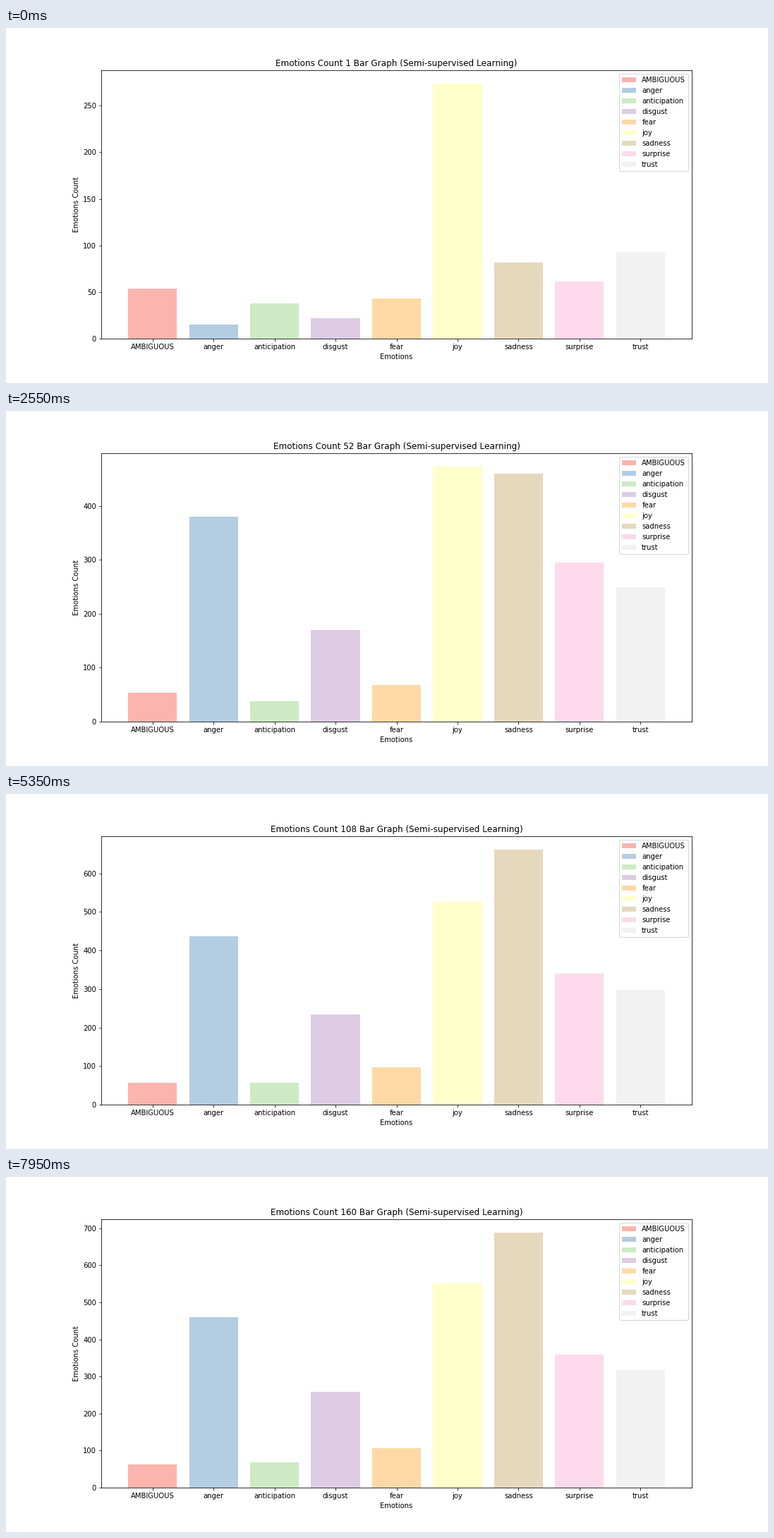
Recreate the animation shown at these times as a matplotlib script. Size 1080 px wide and 504 px high, loop 8 s.

```python
import numpy as np
import matplotlib.pyplot as plt
from matplotlib.animation import FuncAnimation

FRAMES = 160
INTERVAL = 50

# Growth of each count: start, rise, delay, time scale, sharpness
GROWTH = {
    "AMBIGUOUS": (54, 40, 82, 300, 1),
    "anger": (15, 500, 0, 28.4, 0.46),
    "anticipation": (38, 60, 60, 135, 1),
    "disgust": (22, 258, 0, 60.6, 0.95),
    "fear": (43, 72, 20, 67.6, 1.1),
    "joy": (274, 335, 12.7, 47.2, 0.5),
    "sadness": (82, 610, 12.5, 39.5, 1.27),
    "surprise": (61, 340, 0, 37.9, 0.52),
    "trust": (93, 260, 11, 46.2, 0.6),
}


def count_at(i, start, rise, delay, scale, sharpness):
    """Whole count that climbs after a delay and then levels off."""
    t = max(i - delay, 0) / scale
    return round(start + rise * (1 - np.exp(-t ** sharpness)))


def counts_at(i):
    return [count_at(i, *params) for params in GROWTH.values()]


plt.rcParams["font.family"] = "DejaVu Sans"
plt.rcParams["text.kerning_factor"] = 6  # whole-pixel kerning

fig, ax = plt.subplots(figsize=(15, 7), dpi=72, facecolor="white")
fig.subplots_adjust(left=0.125, right=0.9, bottom=0.125, top=0.88)

names = list(GROWTH)
bars = ax.bar(names, counts_at(0), color=plt.get_cmap("Pastel1").colors)
ax.set_xlabel("Emotions")
ax.set_ylabel("Emotions Count")
ax.legend(bars, names, loc="upper right")
title = ax.set_title("")


def update(i):
    counts = counts_at(i)
    for bar, count in zip(bars, counts):
        bar.set_height(count)
    ax.set_ylim(0, max(counts) * 1.05)
    title.set_text(f"Emotions Count {i + 1} Bar Graph (Semi-supervised Learning)")
    return [*bars, title]


anim = FuncAnimation(fig, update, frames=FRAMES, init_func=lambda: update(0),
                     interval=INTERVAL, repeat=True, repeat_delay=0)
plt.show()
```
